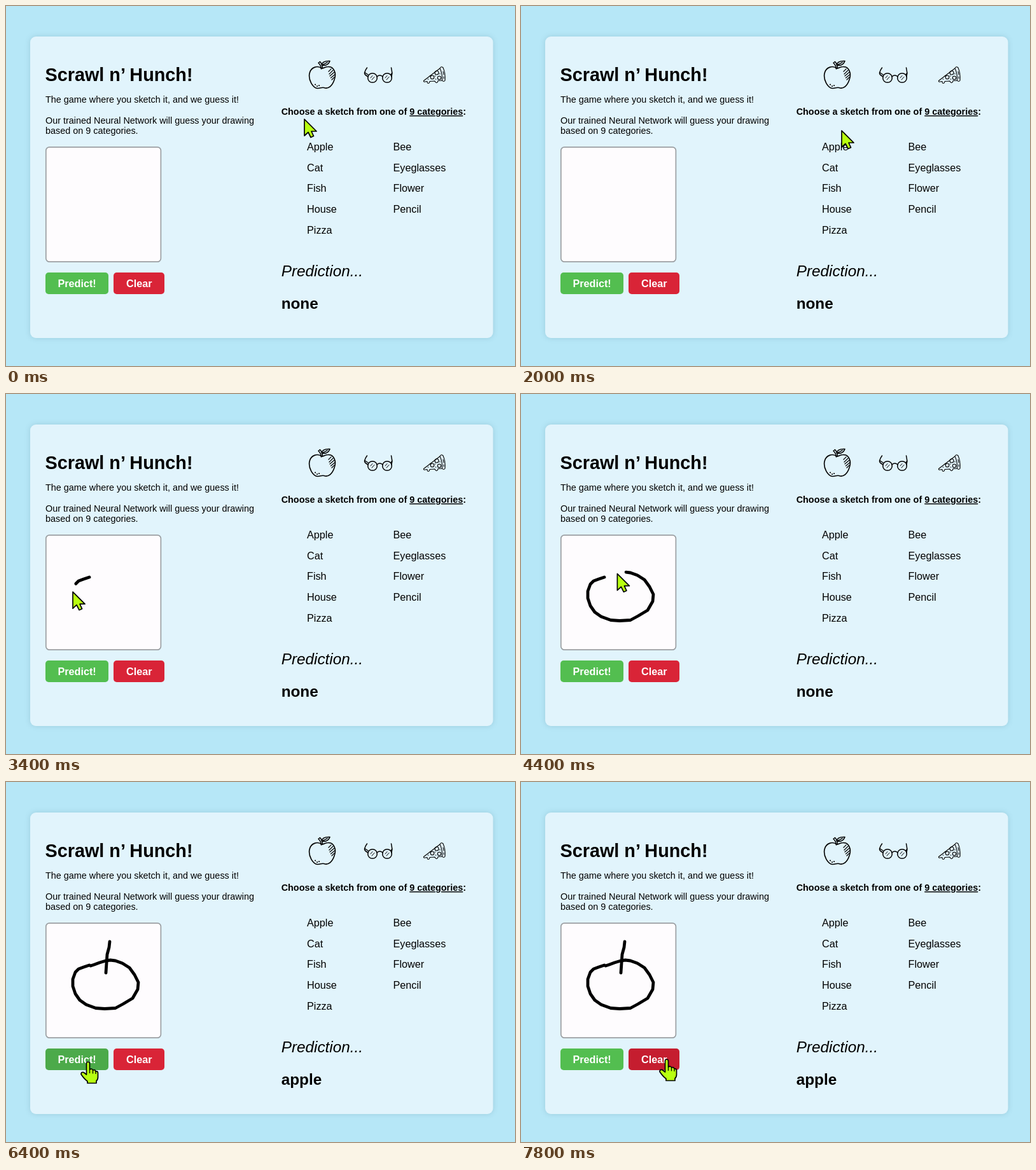
Animation of 800 by 566 pixels, one loop 8000 ms. Source, as an HTML page:

```html
<!DOCTYPE html>
<html lang="en">
<head>
<meta charset="utf-8">
<title>Sketch game</title>
<style>
html, body { margin: 0; width: 100%; height: 100%; overflow: hidden; background: #b6e7f7 }
svg { display: block; font: 14.4px "Liberation Sans", Arial, sans-serif }
.panel { fill: #e1f4fc; filter: drop-shadow(0 0 4px rgba(0, 40, 60, .14)) }
.bold, .button { font-weight: bold }
.list { font-size: 16.2px }
.button { font-size: 16.2px; fill: #fff; text-anchor: middle }
.big { font-size: 24.3px }
.line { fill: none; stroke: #000; stroke-linecap: round; stroke-linejoin: round }
.cursor { fill: #b8ff10; stroke: #000; stroke-width: 1.7; stroke-linejoin: round }
</style>
</head>
<body>
<svg width="800" height="566" viewBox="0 0 800 566">
  <rect class="panel" x="38" y="48" width="727.5" height="474" rx="9"/>
  <text class="bold" x="61.5" y="118" font-size="28.8">Scrawl n’ Hunch!</text>
  <text x="62" y="152">The game where you sketch it, and we guess it!</text>
  <text x="62" y="184.5">Our trained Neural Network will guess your drawing</text>
  <text x="62" y="201">based on 9 categories.</text>
  <rect x="62.8" y="221.8" width="180.6" height="180.4" rx="5.5" fill="#fefcfe" stroke="#9b9fa2" stroke-width="1.7"/>

  <rect id="predict" x="62" y="419" width="99" height="34" rx="5"/>
  <text class="button" x="111.6" y="441.5">Predict!</text>
  <rect id="clear" x="169" y="419" width="80" height="34" rx="5"/>
  <text class="button" x="209.3" y="441.5">Clear</text>

  <!-- apple -->
  <g class="line" stroke-width="1.6">
    <path d="M496 98C490 93 479 96 477 106C475 116 482 129 490 129.5C494 129.5 496 127.5 500 128.5C507 131 513 125 516 116C520 105 515 95 506 95.5C502 95.5 499 98 496 98"/>
    <path d="M495.5 99Q495 93 491 89.5L493.5 87.5Q497 91 497.5 98M496 93Q497 86 509 86.5Q506 95 496 93Q502 91 505 88.5"/>
    <path stroke-width="1.2" d="M507 103L511 99M508 107L514 101M509 110L516 104M510.5 113L516.5 108M512 116L516 112"/>
    <path stroke-width="2" d="M486 123.5h.1M489 126h.1M492 125h.1"/>
  </g>
  <!-- eyeglasses -->
  <g class="line" stroke-width="1.5">
    <circle cx="576" cy="113" r="7.3"/>
    <circle cx="599" cy="113" r="7.3"/>
    <path d="M583 111Q587.500 107 592 111M569 111Q563 108 563.500 105Q565 100 567.500 97M569 108L564.500 105M606 111Q607.500 106 606.500 103L605.500 97M605 108L607 105"/>
    <path stroke-width="1" d="M573 113L576 109.500M575 116L579 111.500M596 113L599 109.500M598 116L602 111.500"/>
  </g>
  <!-- pizza -->
  <g class="line" stroke-width="1.1">
    <path d="M656.500 117.500L682 98Q684 94 687 97Q691 106 690 117Q688 120 685.500 117Q686 106 682 98M656.500 117.500Q656 120 659 119L662 118.500Q662 122 664 121.500T666 118.500L674 118Q675 121 677 120.500T679 117.500L685.500 117"/>
    <circle cx="677" cy="105" r="3"/>
    <circle cx="670" cy="112" r="2.800"/>
    <circle cx="681" cy="113" r="2.700"/>
    <path d="M663 115h1M666 110h1M675 115h1M682 106v1M674 110h1M687 103l1 5M688 111v3"/>
  </g>

  <text class="bold" x="432.7" y="171">Choose a sketch from one of <tspan text-decoration="underline">9 categories</tspan>:</text>
  <g id="names" class="list"></g>
  <text class="big" x="432.7" y="425" font-style="italic">Prediction...</text>
  <text id="answer" class="big bold" x="432.7" y="476"></text>

  <path id="loop" class="line" stroke-width="4.8" d="M131 288L122 291L114 294L109 299L105 310L105 321L109 333L116 343L126 350L141 355.500L155 356.500L172 355.500L184 349L199 340L207 326L208 315L202 303L194 292L183 285L172 281L164 280L157 281L147 284L139 287L133 289"/>
  <path id="stem" class="line" stroke-width="4.8" d="M163 251L162 260L159 271L158 285L157 300"/>

  <path id="arrow" class="cursor" d="M0 0V26L6 20.500L10 28.500L14.500 26.500L11 19H19Z"/>
  <g id="beam" class="line">
    <path id="bar" stroke-width="5" stroke-linecap="square" d="M-6.500-13H-2L0-11L2-13H6.500M0-11V11M-6.500 13H-2L0 11L2 13H6.500"/>
    <use href="#bar" style="stroke:#b8ff10"/>
  </g>
  <g id="hand" class="cursor">
    <path d="M-2.500 3Q-2.500 0 0 0T2.500 3V12Q6.500 10 7.500 13Q11 11.500 12 15Q15.500 14 15.500 18V24Q15.500 28 13 30V33.500H-1V30.500Q-6 27 -11 19.500Q-11 15.500 -7 16.500L-2.500 20Z"/>
    <path fill="none" stroke-width="1.3" d="M2.500 12V18M7.500 13V18.500M12 15V19"/>
  </g>
</svg>
<script>
const $ = id => document.getElementById(id);
const LOOP = 8000, STEP = 200, LEAD = 14;

["Apple", "Bee", "Cat", "Eyeglasses", "Fish", "Flower", "House", "Pencil", "Pizza"].forEach((name, i) => {
  const x = i % 2 ? 608.5 : 473, y = 227 + 32.7 * (i >> 1);
  $("names").innerHTML += `<text x="${x}" y="${y}">${name}</text>`;
});

// The lime core of the text cursor reuses the bar with a thinner stroke.
const core = $("bar").cloneNode();
core.removeAttribute("id");
core.setAttribute("stroke-width", 2);
core.style.stroke = "#b8ff10";
$("beam").querySelector("use").replaceWith(core);

// Keys are [time, ...values], joined by straight lines.
function tween(keys, t) {
  const i = keys.findIndex(k => k[0] > t);
  if (i < 0) return keys[keys.length - 1].slice(1);
  if (i === 0) return keys[0].slice(1);
  const a = keys[i - 1], b = keys[i], p = (t - a[0]) / (b[0] - a[0]);
  return a.slice(1).map((v, j) => v + (b[j + 1] - v) * p);
}

const moves = [
  [0, 469, 178], [1000, 650, 165], [2000, 504, 196], [3200, 131, 288],
  [4600, 133, 289], [5000, 163, 251], [5400, 157, 300], [6200, 129, 440],
  [6800, 129, 440], [7400, 145, 439], [7600, 145, 439], [7800, 229, 436]
];
const loopLength = $("loop").getTotalLength(), stemLength = $("stem").getTotalLength();
const loopKeys = [[3200, 0], [3400, 24], [4400, 249], [4600, loopLength]];
const stemKeys = [[5000, 0], [5400, stemLength]];

function reveal(path, length) {
  path.style.display = length > 0 ? "" : "none";
  path.style.strokeDasharray = length + " 999";
}

function draw(t) {
  const [loopDrawn] = tween(loopKeys, t);
  reveal($("loop"), loopDrawn);
  reveal($("stem"), tween(stemKeys, t)[0]);

  let [x, y] = tween(moves, t);
  if (t > 3200 && t < 4600) ({ x, y } = $("loop").getPointAtLength(loopDrawn + LEAD));

  const onButtons = y > 419 && y < 453;
  const onPredict = onButtons && x > 62 && x < 161;
  const onClear = onButtons && x > 169 && x < 249;
  const onTitle = x > 433 && x < 723 && y > 157 && y < 175;
  const shape = onPredict || onClear ? "hand" : onTitle ? "beam" : "arrow";
  for (const id of ["arrow", "beam", "hand"]) {
    $(id).style.display = id === shape ? "" : "none";
    $(id).setAttribute("transform", `translate(${x} ${y})`);
  }
  $("predict").setAttribute("fill", onPredict ? "#4caa4a" : "#53be50");
  $("clear").setAttribute("fill", onClear ? "#c51d2f" : "#d92437");
  $("answer").textContent = t < 6400 ? "none" : "apple";
}

let start;
function tick(now) {
  start ??= now;
  const t = (now - start) % LOOP;
  draw(Math.floor(t / STEP) * STEP);
  requestAnimationFrame(tick);
}
draw(0);
requestAnimationFrame(tick);
</script>
</body>
</html>
```
